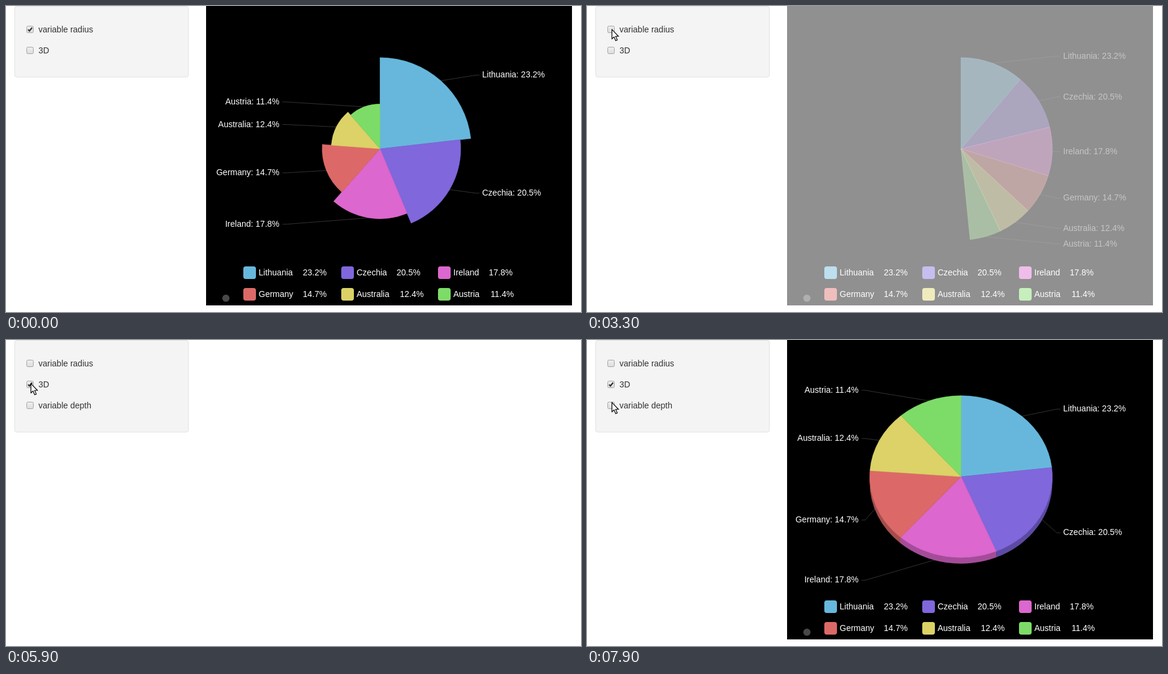
An HTML page with a canvas that plays this animation: 957 by 510 pixels, repeating every 8 s.

```html
<!DOCTYPE html>
<html lang="en">
<head>
<meta charset="utf-8">
<title>Pie chart options</title>
<style>
html, body { margin: 0; width: 100%; height: 100%; overflow: hidden; background: #fff; }
canvas { display: block; }
</style>
</head>
<body>
<canvas id="stage" width="957" height="510"></canvas>
<script>
const ctx = document.getElementById('stage').getContext('2d');
const LOOP = 8000, STEP = 100;
const FONT = '14px "Liberation Sans", Arial, sans-serif';
const BOX = { x: 333, y: 0, w: 609, h: 499 };
const CX = 622.5, R = 152, DEPTH = 10, TAU = Math.PI * 2;

const data = [
  { name: 'Lithuania', pct: 23.2, color: '#67b7dc', wall: '#4b86a1', valueX: 494 },
  { name: 'Czechia', pct: 20.5, color: '#8067dc', wall: '#5d4aa3', valueX: 650 },
  { name: 'Ireland', pct: 17.8, color: '#dc67ce', wall: '#a44c99', valueX: 803.5 },
  { name: 'Germany', pct: 14.7, color: '#dc6967', wall: '#a44e4c', valueX: 494 },
  { name: 'Australia', pct: 12.4, color: '#dcd267', wall: '#a49c4c', valueX: 655.5 },
  { name: 'Austria', pct: 11.4, color: '#7ddc67', wall: '#5da44c', valueX: 806.5 }
];

const clamp = (v, lo = 0, hi = 1) => Math.min(hi, Math.max(lo, v));
const cubicOut = x => 1 - (1 - x) ** 3;
const smooth = x => x * x * (3 - 2 * x);
const part = (t, start, length) => clamp((t - start) / length);
const mix = (a, b, k) => a + (b - a) * k;

function text(str, x, y, color, align = 'left') {
  ctx.fillStyle = color;
  ctx.textAlign = align;
  ctx.fillText(str, x, y);
}

function roundRect(x, y, w, h, r) {
  ctx.beginPath();
  ctx.roundRect(x, y, w, h, r);
}

function poly(points) {
  ctx.beginPath();
  points.forEach(([x, y]) => ctx.lineTo(x, y));
}

// Angles run clockwise from twelve o'clock.
function slicePath(cy, r, ry, from, to) {
  ctx.beginPath();
  ctx.moveTo(CX, cy);
  ctx.ellipse(CX, cy, r, ry, 0, from - TAU / 4, to - TAU / 4);
  ctx.closePath();
}

function drawWall(cy, ry, from, to) {
  const a = Math.max(from, TAU / 4) - TAU / 4;
  const b = Math.min(to, TAU * 3 / 4) - TAU / 4;
  if (b <= a) return;
  ctx.beginPath();
  ctx.ellipse(CX, cy, R, ry, 0, a, b);
  ctx.ellipse(CX, cy + DEPTH, R, ry, 0, b, a, true);
  ctx.closePath();
  ctx.fill();
}

function layout(mode, sweep) {
  let angle = 0;
  return data.map(d => {
    const from = angle;
    angle += d.pct / 100 * TAU * sweep;
    const r = mode === 'radius' ? R * d.pct / data[0].pct : R;
    return { ...d, from, to: angle, mid: (from + angle) / 2, r };
  });
}

function drawLabel(s, mode, cy, squash, end) {
  const left = s.mid > Math.PI;
  const dir = left ? -1 : 1;
  const y = 237 - (s.r * 1.05 + 5) * Math.cos(s.mid);
  let x;
  if (!left) x = CX + R * Math.sin(Math.min(end, TAU / 4)) + 18.5;
  else if (mode === 'radius') x = 455;
  else x = CX + R * Math.sin(Math.min(end, TAU * 3 / 4)) - 18.5;

  poly([
    [CX + s.r * Math.sin(s.mid), cy - s.r * squash * Math.cos(s.mid)],
    [x - dir * 11, y + 1],
    [x - dir * 5, y + 1]
  ]);
  ctx.strokeStyle = 'rgba(255,255,255,.2)';
  ctx.lineWidth = 1;
  ctx.stroke();
  text(`${s.name}: ${s.pct}%`, x - (left ? 0 : .5), Math.round(y) + 5, '#fff', left ? 'right' : 'left');
}

function drawPie(mode, sweep) {
  const deep = mode === 'deep';
  const cy = deep ? 227.8 : 238;
  const squash = deep ? .888 : 1;
  const slices = layout(mode, sweep);
  const end = slices[slices.length - 1].to;

  ctx.globalAlpha = sweep;
  slices.forEach(s => drawLabel(s, mode, cy, squash, end));

  if (deep) {
    slices.forEach(s => {
      ctx.fillStyle = s.wall;
      drawWall(cy, R * squash, s.from, s.to);
    });
    if (end < Math.PI) {
      const x = CX + R * Math.sin(end), y = cy - R * squash * Math.cos(end);
      poly([[CX, cy], [x, y], [x, y + DEPTH], [CX, cy + DEPTH]]);
      ctx.fill();
    }
  }
  slices.forEach(s => {
    slicePath(cy, s.r, s.r * squash, s.from, s.to);
    ctx.fillStyle = ctx.strokeStyle = s.color;
    ctx.lineWidth = .6;
    ctx.fill();
    ctx.stroke();
  });
  ctx.globalAlpha = 1;
}

function drawLegend() {
  const columns = [395, 558, 719];
  data.forEach((d, i) => {
    const x = columns[i % 3], y = i < 3 ? 434 : 470;
    roundRect(x, y, 21, 21, 4);
    ctx.fillStyle = d.color;
    ctx.fill();
    text(d.name, x + 25.5, y + 15, '#fff');
    text(`${d.pct}%`, d.valueX, y + 15, '#fff');
  });
}

function drawChart(mode, fade, sweep) {
  ctx.fillStyle = '#000';
  ctx.fillRect(BOX.x, BOX.y, BOX.w, BOX.h);
  drawPie(mode, sweep);
  drawLegend();
  ctx.beginPath();
  ctx.arc(366, 487, 6, 0, TAU);
  ctx.fillStyle = '#484848';
  ctx.fill();
  if (fade < 1) {
    ctx.fillStyle = `rgba(255,255,255,${1 - fade})`;
    ctx.fillRect(BOX.x, BOX.y, BOX.w, BOX.h);
  }
}

function drawCheckbox(y, label, checked) {
  const g = ctx.createLinearGradient(0, y - 6, 0, y + 6);
  g.addColorStop(0, '#f0f0f0');
  g.addColorStop(1, '#dcdcdc');
  roundRect(34.5, y - 5.5, 11, 11, 2);
  ctx.fillStyle = g;
  ctx.fill();
  ctx.strokeStyle = '#a3a3a3';
  ctx.lineWidth = 1;
  ctx.stroke();
  if (checked) {
    poly([[36.8, y + .2], [39, y + 2.5], [43.5, y - 3]]);
    ctx.strokeStyle = '#333';
    ctx.lineWidth = 2.2;
    ctx.stroke();
  }
  text(label, 54, y + 5, '#333');
}

function drawPanel(t) {
  const open = t >= 5900;
  roundRect(14.5, .5, 289, open ? 153 : 118, 3.5);
  ctx.fillStyle = '#f4f4f4';
  ctx.fill();
  ctx.strokeStyle = '#e2e2e2';
  ctx.lineWidth = 1;
  ctx.stroke();
  drawCheckbox(39, 'variable radius', t < 2600);
  drawCheckbox(74, '3D', t >= 5600);
  if (open) drawCheckbox(109, 'variable depth', false);
}

function cursorAt(t) {
  if (t < 1800) {
    const k = cubicOut(part(t, 1100, 400));
    return [mix(85, 45, k), mix(27, 39, k)];
  }
  if (t < 1900) return [43, 39];
  if (t < 2300) return [40, 39];
  const y = mix(39, 72.5, smooth(part(t, 4200, 800)));
  return [41, y + 31.5 * part(t, 7400, 500) ** 2];
}

function drawCursor(t) {
  if (t < 1100) return;
  const [x, y] = cursorAt(t);
  const shape = [[0, 0], [0, 15.5], [3.5, 12.3], [6.2, 18.6], [8.9, 17.4], [6.2, 11.3], [10.8, 11.3]];
  poly(shape.map(([dx, dy]) => [x + .5 + dx, y + .2 + dy]));
  ctx.closePath();
  ctx.fillStyle = '#fff';
  ctx.fill();
  ctx.strokeStyle = '#000';
  ctx.lineWidth = 1.2;
  ctx.stroke();
}

function drawEntry(t, mode, shown, start, limit) {
  if (t < shown) return;
  const fade = clamp(cubicOut(part(t, start, 1500)), .05, limit);
  drawChart(mode, fade, cubicOut(part(t, start + 62, 1000)));
}

function draw(t) {
  ctx.fillStyle = '#fff';
  ctx.fillRect(0, 0, 957, 510);
  ctx.font = FONT;
  drawPanel(t);
  if (t < 2800) drawChart('radius', 1, 1);
  else if (t < 5900) drawEntry(t, 'flat', 3000, 3040, .882);
  else drawEntry(t, 'deep', 6100, 6253, 1);
  drawCursor(t);
}

const begin = performance.now();
function tick() {
  const t = (performance.now() - begin) % LOOP;
  draw(Math.floor(t / STEP) * STEP);
  requestAnimationFrame(tick);
}
tick();
</script>
</body>
</html>
```
